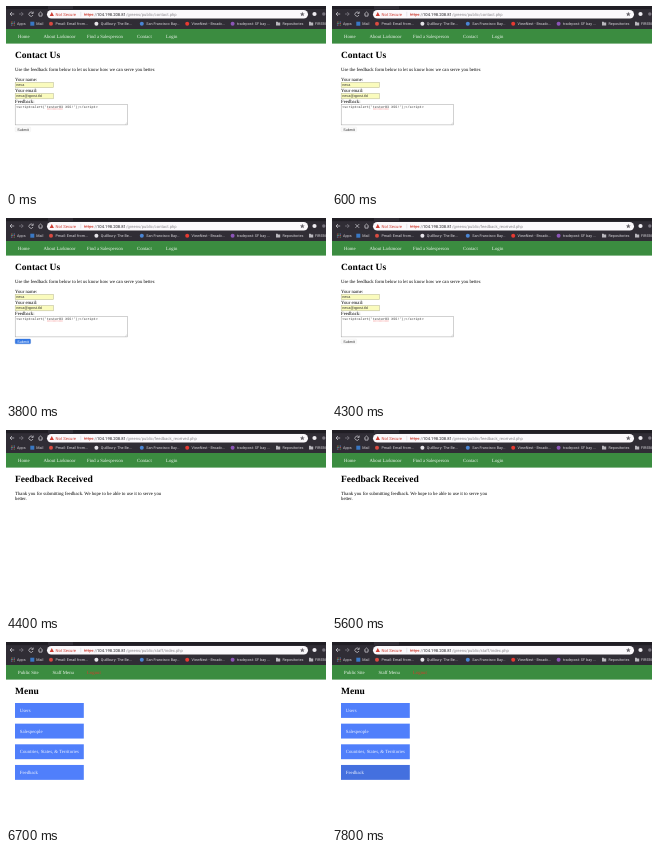
Recreate the animation shown at these times as an HTML page. Size 320 px wide and 184 px high, loop 8000 ms.

```html
<!DOCTYPE html>
<html lang="en">
<head>
<meta charset="utf-8">
<title>Feedback form</title>
<style>
  html, body { margin: 0; height: 100%; overflow: hidden; background: #fff; }
  svg { display: block; width: 100vw; height: 100vh; }
  text { text-rendering: geometricPrecision; white-space: pre; }
  .serif { font-family: "Liberation Serif", serif; font-size: 4.76px; }
  .title { font-family: "Liberation Serif", serif; font-size: 9.5px; font-weight: bold; }
  .sans { font-family: "Liberation Sans", sans-serif; font-size: 3.7px; }
  .mark { font-family: Roboto, sans-serif; font-size: 3.75px; fill: #d9d7dc; }
  .url { font-family: Roboto, sans-serif; font-size: 4.15px; }
  .mono { font-family: "Liberation Mono", monospace; font-size: 3.4px; }
  .line { fill: none; stroke: #d5d3d8; stroke-width: .7; }
  .dim { fill: none; stroke: #85828a; stroke-width: .7; }
</style>
</head>
<body>
<svg id="stage" viewBox="0 0 320 184"></svg>
<script>
const LOOP = 8000;
const stage = document.getElementById("stage");
const $ = id => document.getElementById(id);

const rect = (x, y, w, h, fill, extra = "") =>
  `<rect x="${x}" y="${y}" width="${w}" height="${h}" fill="${fill}" ${extra}/>`;
const text = (x, y, str, cls = "serif", fill = "#000", extra = "") =>
  `<text x="${x}" y="${y}" class="${cls}" ${fill ? `fill="${fill}"` : ""} ${extra}>${str}</text>`;
const dot = (x, y, r, fill) => `<circle cx="${x}" cy="${y}" r="${r}" fill="${fill}"/>`;
const path = (d, extra = 'class="line"') => `<path d="${d}" ${extra}/>`;
const group = (id, content) => `<g id="${id}">${content}</g>`;

const folder = x => path(`M${x} 15.8h1.6l.5.6h2.1v3h-4.2z`, 'fill="#b9b7bd"');

// Long bookmarks are cut to one width, so they sit at an even pitch.
const longMarks = [
  ["Pmail: Email from...", "#d94b41"], ["Quillbury: The Be...", "#e5e3e8"],
  ["San Francisco Bay...", "#4a85d4"], ["ViewNest - Broadc...", "#e63a32"],
  ["tradepost: SF bay ...", "#8b55b7"]
].map(([label, color], i) => {
  const x = 43 + i * 45.4;
  return dot(x + 2, 17.7, 2, color) + text(x + 6.4, 18.9, label, "mark", "");
}).join("");

const appsIcon = [0, 1, 2].map(r => [0, 1, 2].map(c =>
  dot(5.4 + c * 1.5, 16.1 + r * 1.5, .5, ["#e15b50", "#66b66b", "#6d9bea"][(r + c) % 3])).join("")).join("");

const bookmarks = appsIcon + text(11, 18.9, "Apps", "mark", "") +
  rect(24.3, 15.7, 4, 4, "#3978c4") + text(30.2, 18.9, "Mail", "mark", "") + longMarks +
  folder(270) + text(276.5, 18.9, "Repositories", "mark", "") +
  folder(303) + text(309, 18.9, "FIREBIRD", "mark", "");

const browser =
  rect(0, 0, 320, 23, "#302d35") + rect(0, 0, 320, 3.2, "#201e24") + rect(42, 0, 25, 3.2, "#302d35") +
  path("M8.2 8H4m2-2L4 8l2 2") + path("M13 8h4.2m-2-2l2 2-2 2", 'class="dim"') +
  group("reload", path("M26.8 7A2.1 2.1 0 1 0 27 9M27.2 5.6V7.4H25.4")) +
  group("stop", path("M23.4 6.1l3.8 3.8m0-3.8l-3.8 3.8")) +
  path("M32.2 8.2l2.3-2.2 2.3 2.2M33 7.8v2.3h3V7.8") +
  rect(41, 3.9, 261, 8.7, "#fbf9fc", 'rx="4.3"') +
  path("M45.8 6.1l2.1 3.8h-4.2z", 'fill="#cf3f35"') +
  text(49.6, 9.6, "Not Secure", "url", "#cf3f35") +
  rect(74.7, 5.8, .4, 4.6, "#c9c6cc") +
  text(78, 9.6, '<tspan fill="#cf3f35" text-decoration="line-through">https</tspan><tspan fill="#77747a">://</tspan>', "url", "") +
  text(91, 9.6, '<tspan fill="#242227">104.198.208.81</tspan><tspan id="address" fill="#8b888e"></tspan>', "url", "") +
  path("M296.3 5.8l.7 1.6 1.7.1-1.3 1.1.5 1.7-1.6-1-1.5 1 .4-1.7-1.3-1.1 1.7-.1z", 'fill="#66636a"') +
  dot(308.5, 8, 2.1, "#eeecf1") + dot(317.8, 8, 1.7, "#77737d") +
  bookmarks + rect(0, 23, 320, 14.6, "#3b8c40");

const navLinks = links => links.map(([x, label, color = "#eef6ee"]) =>
  text(x, 31.8, label, "serif", color)).join("");
const publicNav = navLinks([
  [12, "Home"], [37.5, "About Larkmoor"], [81, "Find a Salesperson"], [131, "Contact"], [160, "Login"]
]);
const staffNav = navLinks([[12, "Public Site"], [46.5, "Staff Menu"], [81, "Logout", "#d7392c"]]);

const field = (id, y, value) =>
  rect(9.2, y, 38.4, 5.4, "#fafbbd", `id="${id}" stroke="#b5b59a" stroke-width=".5"`) +
  text(10.2, y + 3.9, value, "sans", "#333");

const form = text(9, 52, "Contact Us", "title") +
  text(9, 64.9, "Use the feedback form below to let us know how we can serve you better.") +
  text(9, 74.6, "Your name:") + field("name", 76.3, "neva") +
  text(9, 85.9, "Your email:") + field("email", 87.4, "neva@qpost.tld") +
  rect(38.1, 88, .5, 4.2, "#000", 'id="caret"') +
  text(9, 97.2, "Feedback:") +
  rect(9.2, 98.3, 112.4, 20.6, "#fff", 'stroke="#999" stroke-width=".45"') +
  path("M121 116.6l-1.8 1.8m1.8-.7l-.7.7", 'stroke="#999" stroke-width=".3"') +
  text(10.3, 102.2, "&lt;script&gt;alert('tester03 XSS!');&lt;/script&gt;", "mono", "#333") +
  path("M41 103h16", 'stroke="#e44" stroke-width=".5" stroke-dasharray=".7 .5"') +
  rect(9.2, 121, 15.4, 4.8, "#fafafa", 'id="button" rx=".8" stroke="#e2e2e2" stroke-width=".3"') +
  text(11.2, 124.7, "Submit", "sans", "#333", 'id="submit"');

const received = text(9, 52, "Feedback Received", "title") +
  text(9, 64.9, "Thank you for submitting feedback. We hope to be able to use it to serve you") +
  text(9, 70.2, "better.");

const menu = text(9, 52, "Menu", "title") +
  ["Users", "Salespeople", "Countries, States, &amp; Territories", "Feedback"].map((label, i) => {
    const y = 61 + i * 20.65;
    return rect(9, y, 68.8, 14.9, "#507ffb", `id="item${i}"`) + text(13.8, y + 9, label, "serif", "#eef3ff");
  }).join("");

stage.innerHTML = rect(0, 0, 320, 184, "#fff") + browser +
  group("public", publicNav) + group("staff", staffNav) +
  group("form", form) + group("received", received) + group("menu", menu);

const show = (id, on) => $(id).setAttribute("display", on ? "inline" : "none");
const paint = (id, fill, stroke) => {
  $(id).setAttribute("fill", fill);
  if (stroke) $(id).setAttribute("stroke", stroke);
};

function draw(t) {
  const within = (from, to) => t >= from && t < to;
  const loading = within(3900, 4400) || within(6600, 6700);
  const focused = within(2900, 3800);
  const pressed = within(3800, 3900);
  const staff = t >= 6700;

  show("stop", loading);
  show("reload", !loading);
  show("public", !staff);
  show("staff", staff);
  // The address changes one step before the new page is painted.
  show("form", t < 4400);
  show("received", within(4400, 6700));
  show("menu", staff);
  show("caret", within(2900, 3400));

  $("address").textContent = "/greens/public/" +
    (t < 4300 ? "contact.php" : t < 6600 ? "feedback_received.php" : "staff/index.php");
  paint("email", focused ? "#fff" : "#fafbbd", focused ? "#4c8fdc" : "#b5b59a");
  $("email").setAttribute("stroke-width", focused ? 1 : .5);
  paint("button", pressed ? "#3579e6" : "#fafafa", pressed ? "#2860bd" : "#e2e2e2");
  paint("submit", pressed ? "#fff" : "#333");
  paint("item3", t >= 7400 ? "#4470df" : "#507ffb");
}

function tick() {
  draw(performance.now() % LOOP);
  requestAnimationFrame(tick);
}
tick();
</script>
</body>
</html>
```
